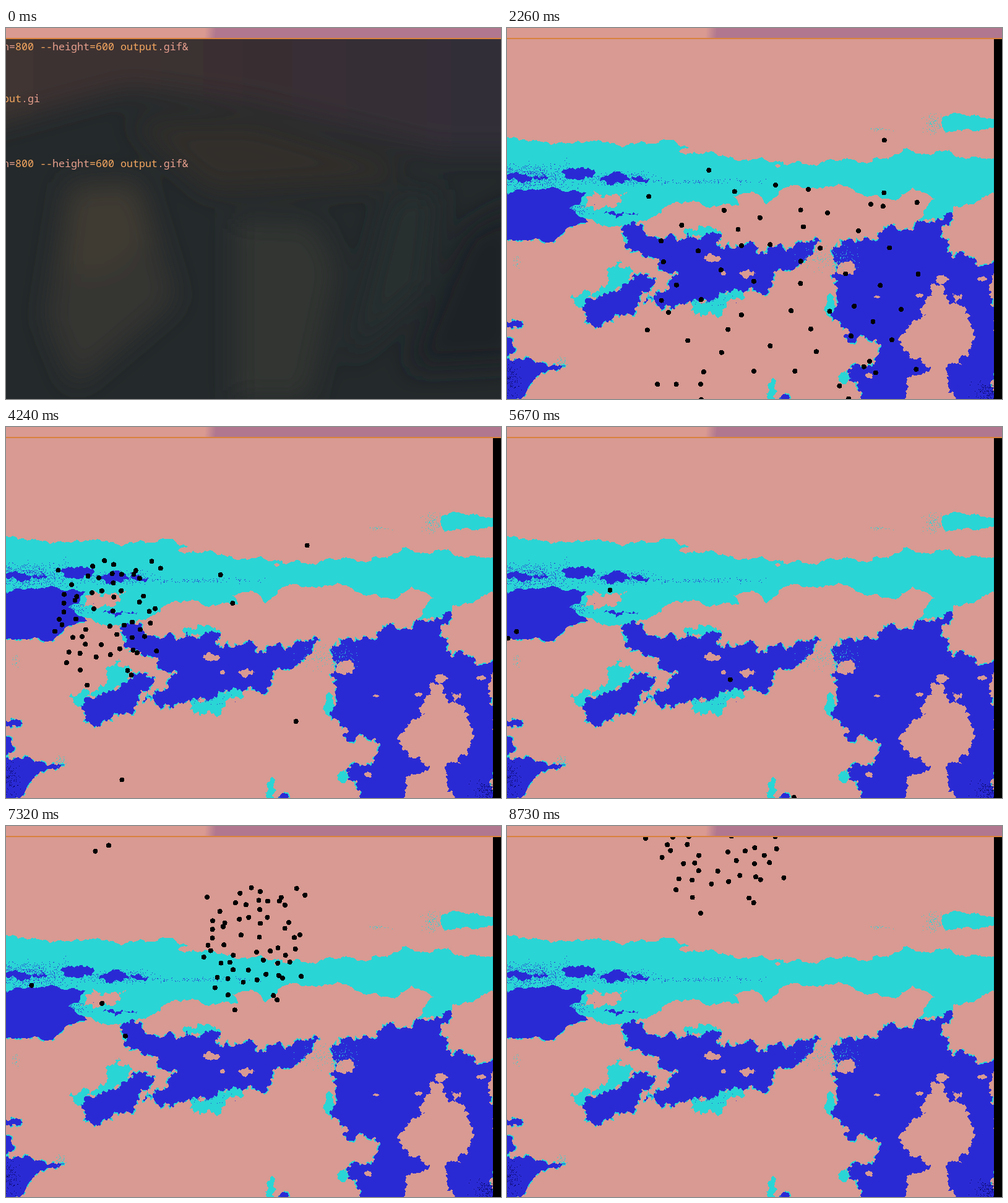
Recreate the animation shown at these times as an HTML page. Size 800 by 600 pixels, loop 8.76 s.

```html
<!DOCTYPE html>
<html lang="en">
<head>
<meta charset="utf-8">
<title>Flock over a map</title>
<style>
html, body { margin: 0; width: 100%; height: 100%; overflow: hidden; background: #24292c; }
svg { display: block; width: 800px; height: 600px; }
text { font: 16.667px "Noto Sans Mono", "DejaVu Sans Mono", monospace; fill: #e8a08e; white-space: pre; }
.o { fill: #f5a75f; }
#map { shape-rendering: crispEdges; }
</style>
</head>
<body>
<svg viewBox="0 0 800 600">
  <defs>
    <filter id="soft" x="-50%" y="-50%" width="200%" height="200%"><feGaussianBlur stdDeviation="22"/></filter>
    <linearGradient id="bar" gradientUnits="userSpaceOnUse" x1="322" x2="340" y1="0" y2="2">
      <stop offset="0" stop-color="#da9a92"/><stop offset="1" stop-color="#b0778f"/>
    </linearGradient>
    <linearGradient id="sky">
      <stop offset="0" stop-color="#403533"/><stop offset=".45" stop-color="#3a2f32"/><stop offset="1" stop-color="#312f39"/>
    </linearGradient>
  </defs>
  <g id="term">
    <rect width="800" height="600" fill="#24292b"/>
    <g filter="url(#soft)">
      <path d="M-60-40H860V200H700L400 125L200 95L-60 165Z" fill="url(#sky)"/>
      <path d="M200 150L400 150L640 220L620 250L330 265Z" fill="#332f2c"/>
      <path d="M100 250L215 245L275 440L110 580L65 470Z" fill="#343430"/>
      <path d="M110 270L205 260L230 340L170 395L100 400Z" fill="#3f3a31"/>
      <path d="M370 310L500 315L535 390L490 600H370Z" fill="#333432"/>
      <path d="M620 270L700 260L680 420L550 540Z" fill="#272d2f"/>
      <path d="M740 330L830 280V540L650 550Z" fill="#1e2325"/>
    </g>
    <text x="-5" y="36">n=<tspan class="o">800 --</tspan>height<tspan class="o">=600 output</tspan>.gif&amp;</text>
    <text x="-5" y="120"><tspan class="o">put</tspan>.gi</text>
    <text x="-5" y="225">n=<tspan class="o">800 --</tspan>height<tspan class="o">=600 output</tspan>.gif&amp;</text>
  </g>
  <g id="map" visibility="hidden">
    <rect y="18" width="800" height="582" fill="#d89a92"/>
    <g id="land"></g>
    <rect x="787" y="18" width="13" height="582"/>
    <path id="flock"/>
  </g>
  <rect width="800" height="16" fill="url(#bar)"/>
  <rect y="16" width="800" height="2" fill="#d9823b"/>
</svg>
<script>
const $ = id => document.getElementById(id);
const CYAN = '#2ad5d5', BLUE = '#2a2ad5', SAND = '#d89a92', NAVY = '#05055c';
const LOOP = 8760, START = 1410, END = 8730, STEP = 40.5;

let seed = 41;
const rnd = () => (seed = (seed * 16807) % 2147483647) / 2147483647;
const spread = () => rnd() + rnd() + rnd() - 1.5;
const pairs = s => s.trim().split(/\s+/).map(p => p.split(',').map(Number));

function addPath(d, attrs) {
  const el = document.createElementNS('http://www.w3.org/2000/svg', 'path');
  el.setAttribute('d', d);
  for (const k in attrs) el.setAttribute(k, attrs[k]);
  $('land').append(el);
}

// Coastline: split every edge at a displaced midpoint until it is short.
function split(a, b, amp, out) {
  const dx = b[0] - a[0], dy = b[1] - a[1], len = Math.hypot(dx, dy);
  if (len < 3.5) { out.push(b.map(Math.round)); return; }
  const k = (rnd() - .5) * amp * Math.min(1, 20 / len);
  const m = [(a[0] + b[0]) / 2 - dy * k, (a[1] + b[1]) / 2 + dx * k];
  split(a, m, amp, out);
  split(m, b, amp, out);
}

function coast(color, pts, amp) {
  const out = [];
  pts.forEach((p, i) => split(p, pts[(i + 1) % pts.length], amp, out));
  const d = 'M' + out.join('L') + 'Z';
  if (color === BLUE) addPath(d, { fill: 'none', stroke: CYAN, 'stroke-width': 4, 'stroke-dasharray': '13 9 5 12' });
  addPath(d, { fill: color });
}
const land = (color, shape, amp = .9) => coast(color, pairs(shape), amp);

function blob(color, x, y, rx, ry) {
  const pts = [];
  for (let i = 0; i < 8; i++) {
    const a = i * Math.PI / 4, r = .8 + rnd() * .4;
    pts.push([x + rx * r * Math.cos(a), y + ry * r * Math.sin(a)]);
  }
  coast(color, pts, .7);
}

function dust(color, x, y, w, h, n) {
  let d = '';
  while (n--) d += `M${Math.round(x + spread() * w)} ${Math.round(y + spread() * h)}h1v1h-1z`;
  addPath(d, { fill: color });
}

function drawLand() {
  land(CYAN, `-9,178 30,182 165,186 180,190 270,181 280,192 328,200 355,209 440,215 575,217 622,208 640,195
    660,203 715,197 732,210 795,212 795,266 722,288 720,300 662,312 692,276 655,258 634,276 585,272 535,252
    500,260 450,258 418,285 395,264 365,272 375,287 330,290 310,281 255,289 225,312 150,318 -9,290`, .45);
  land(CYAN, '705,143 720,138 795,146 795,162 735,167 708,168', .4);
  land(CYAN, '280,434 392,420 355,446 303,466');
  land(CYAN, '183,374 204,392 190,424 128,440 122,452 104,432 150,426');
  blob(CYAN, 315, 329, 32, 8);
  blob(CYAN, 193, 332, 8, 16);
  blob(CYAN, 522, 450, 8, 18);
  blob(CYAN, 430, 588, 6, 20);
  blob(CYAN, 545, 565, 9, 9);
  blob(CYAN, 725, 572, 12, 25);

  land(BLUE, '-9,270 75,257 128,266 118,285 100,292 131,314 100,322 75,346 -9,345', .3);
  blob(BLUE, 117, 236, 28, 9);
  blob(BLUE, 188, 244, 38, 7);
  blob(BLUE, 187, 300, 28, 3);
  blob(BLUE, 30, 241, 46, 7);
  land(BLUE, `190,318 218,318 224,335 248,343 340,333 338,350 345,357 398,349 420,367 445,352 508,344 495,362
    470,385 430,402 412,432 404,421 340,437 300,442 222,445 260,415 282,395 245,388 240,372 190,352`);
  land(BLUE, '120,450 128,437 170,428 215,397 240,402 218,425 215,440 190,465 140,482');
  land(BLUE, `528,372 600,332 615,322 635,332 655,328 660,315 720,301 702,340 718,370 795,386 795,610 570,610
    550,555 590,548 602,525 590,507 540,495 525,460 533,450 524,400`);
  land(BLUE, '-9,538 95,547 55,557 35,580 8,610 -9,610', .5);
  blob(BLUE, 8, 479, 19, 7);
  blob(BLUE, 0, 515, 11, 14);
  blob(BLUE, 449, 598, 8, 7);

  land(SAND, '118,288 140,263 194,264 182,270 186,278 150,293');
  blob(SAND, 300, 199, 24, 4);
  blob(SAND, 437, 223, 4, 3);
  blob(SAND, 331, 373, 13, 6);
  blob(SAND, 389, 397, 13, 6);
  blob(SAND, 350, 397, 4, 4);
  blob(SAND, 549, 390, 14, 11);
  land(SAND, `634,506 665,470 690,438 684,422 700,415 713,440 726,446 720,428 735,430 755,490 735,545 712,548
    718,610 646,610 660,562 685,548 650,530`);
  blob(SAND, 702, 407, 11, 7);
  blob(SAND, 768, 406, 8, 4);
  blob(SAND, 787, 415, 7, 22);
  blob(SAND, 598, 435, 6, 2);
  blob(SAND, 667, 432, 6, 3);
  blob(SAND, 586, 562, 6, 5);
  blob(SAND, 544, 492, 9, 5);

  dust(BLUE, 35, 240, 75, 22, 700);
  dust(BLUE, 90, 294, 42, 9, 220);
  dust(BLUE, 185, 244, 60, 10, 260);
  dust(BLUE, 320, 248, 90, 4, 90);
  dust(BLUE, 305, 436, 50, 10, 130);
  dust(CYAN, 690, 155, 18, 14, 110);
  dust(CYAN, 600, 163, 18, 3, 25);
  dust(CYAN, 15, 377, 7, 10, 22);
  dust(CYAN, 88, 540, 8, 8, 45);
  dust(CYAN, 520, 372, 45, 22, 150);
  dust(NAVY, 778, 588, 24, 20, 170);
  dust(NAVY, 5, 568, 16, 28, 130);
}

// Every dot keeps a place (u, v) in a unit square, rounded to a disc once flocked.
function makeDot(_, i) {
  const u = (i * .75488 + rnd() * .06) % 1, v = (i * .56984 + rnd() * .06) % 1;
  const a = 2 * u - 1, b = 2 * v - 1, far = .85 + .6 * rnd() ** 4;
  return { u, v, x: a * Math.sqrt(1 - b * b / 2) * far, y: b * Math.sqrt(1 - a * a / 2) * far };
}

// Flock poses: time, centre, radii.
const poses = [
  [3110, 455, 498, 100, 108],
  [4240, 165, 308, 96, 104],
  [5670, -235, 330, 96, 104],
  [6730, 230, 260, 92, 100],
  [7320, 400, 190, 92, 102],
  [7600, 465, 145, 95, 102],
  [8490, 440, 122, 115, 108],
  [END, 352, 27, 115, 108]
];

// Loners: places at the start and at the first five poses but the fourth.
const loners = [
  '618,203 589,167 487,191 360,409 193,340',
  '340,276 319,198 347,239 166,264 155,287',
  '320,581 293,572 188,571 15,330 41,258',
  '387,328 363,319 367,285 1,341 144,41',
  '554,490 595,567 469,476 463,598 166,32'
].map(pairs);

function curve(pts) {
  const slope = (k, c) => {
    const a = pts[Math.max(0, k - 1)], b = pts[Math.min(pts.length - 1, k + 1)];
    return (b[c] - a[c]) / (b[0] - a[0]);
  };
  return t => {
    let k = 0;
    while (k < pts.length - 2 && t >= pts[k + 1][0]) k++;
    const a = pts[k], b = pts[k + 1], d = b[0] - a[0], u = (t - a[0]) / d, v = 1 - u;
    return [1, 2].map(c => a[c] * (1 + 2 * u) * v * v + b[c] * u * u * (3 - 2 * u)
      + d * u * v * (slope(k, c) * v - slope(k + 1, c) * u));
  };
}

function flockPath({ u, v, x, y }) {
  const pts = poses.map(([t, cx, cy, rx, ry]) => [t, cx + x * rx, cy + y * ry]);
  return curve([[START, u * 790, 40 + v * 565], ...pts]);
}

function lonerPath(p, i) {
  const times = [START, 3110, 4240, 5670, 7320];
  const pts = p.map((q, k) => [times[k], ...q]);
  return curve([...pts, [END, 224 + i * 70, 20 - i * 3]]);
}

drawLand();
const paths = [...Array.from({ length: 60 }, makeDot).map(flockPath), ...loners.map(lonerPath)];

function draw(time) {
  const t = time % LOOP, flying = t >= START;
  $('term').setAttribute('visibility', flying ? 'hidden' : 'visible');
  $('map').setAttribute('visibility', flying ? 'visible' : 'hidden');
  if (!flying) return;
  const at = Math.min(END, START + Math.floor((t - START + 12) / STEP) * STEP);
  const d = paths.map(path => {
    const [x, y] = path(at);
    return `M${(x - 4).toFixed(1)} ${y.toFixed(1)}a4 4 0 1 1 8 0a4 4 0 1 1-8 0z`;
  });
  $('flock').setAttribute('d', d.join(''));
}

const begin = performance.now();
function tick() {
  draw(performance.now() - begin);
  requestAnimationFrame(tick);
}
tick();
</script>
</body>
</html>
```
